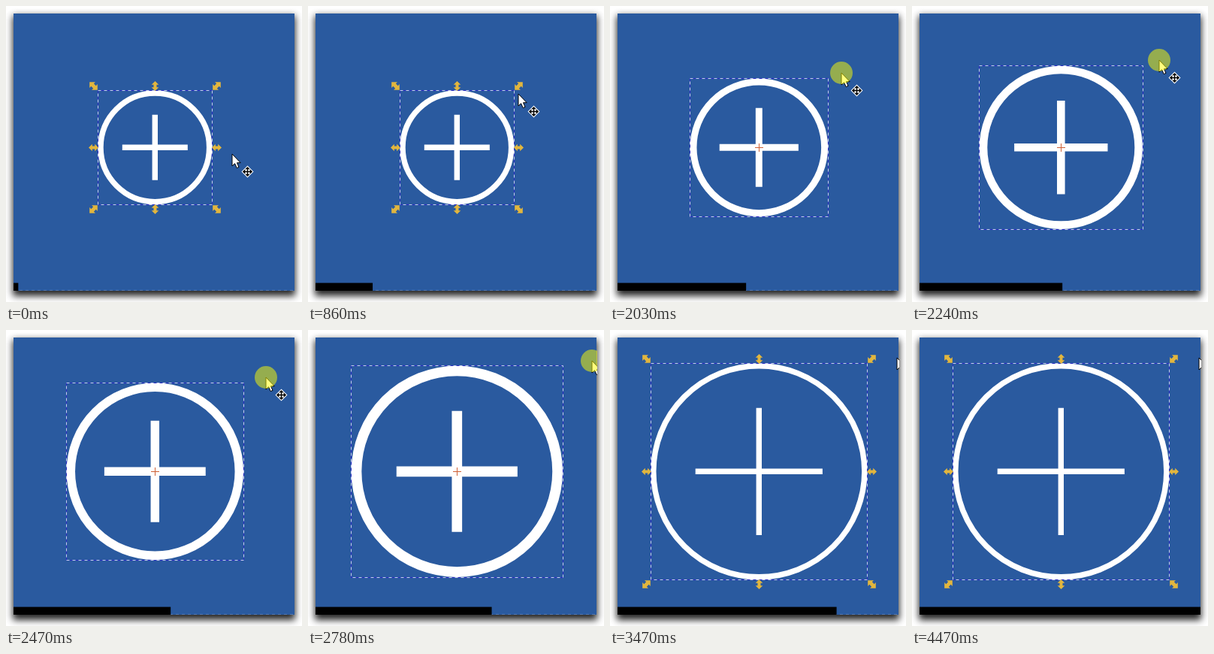
An HTML page that plays this animation: 394x394 px, repeating every 4550 ms.

```html
<!DOCTYPE html>
<html lang="en">
<head>
<meta charset="utf-8">
<title>Scaling an icon</title>
<style>
  html, body { margin: 0; width: 100%; height: 100%; overflow: hidden; background: #fff; }
  svg { display: block; width: 100vw; height: 100vh; }
</style>
</head>
<body>
<svg viewBox="0 0 394 394">
  <defs>
    <filter id="blur" x="-10%" y="-10%" width="120%" height="120%">
      <feGaussianBlur stdDeviation="5"/>
    </filter>
    <clipPath id="view"><rect x="10" y="10" width="375" height="370"/></clipPath>
    <path id="arrow" fill="#e2b63e"
      d="M-6.5 0L-1.7-4.8V-2H1.7V-4.8L6.5 0L1.7 4.8V2H-1.7V4.8Z"/>
    <path id="slant" fill="#e2b63e"
      d="M-7.5 0L-2-5.5V-2.5H2V-5.5L7.5 0L2 5.5V2.5H-2V5.5Z"/>
  </defs>

  <rect x="9" y="13" width="376" height="373" opacity=".85" filter="url(#blur)"/>
  <rect x="10" y="10" width="374" height="369" fill="#2a5a9f"/>
  <path d="M10 378.5H384" stroke="#8ea6cc" stroke-opacity=".4" stroke-dasharray="4 4"/>
  <rect id="bar" x="10" y="368.6" height="10.4"/>

  <g id="icon" fill="none" stroke="#fff" transform="translate(198.3 188.3)">
    <circle id="ring"/>
    <path id="plus"/>
  </g>
  <g fill="none">
    <rect class="box" stroke="#2a2cc4"/>
    <rect class="box" stroke="#c3cbee" stroke-dasharray="4 4"/>
  </g>
  <path id="pivot" d="M193 188.5H204M198.5 183V194" stroke="#cf6238"/>
  <g id="handles"></g>

  <g clip-path="url(#view)">
    <g id="cursor">
      <path d="M0 0V16L3.6 12.7L6.2 18.6L9 17.4L6.5 11.7H11.2Z" fill="#fff" stroke="#000"/>
      <g transform="translate(20.5 23.5)">
        <path d="M0-8L8 0L0 8L-8 0Z" fill="#fff"/>
        <path d="M-4 0H4M0-4V4" stroke="#000" stroke-width="1.4"/>
        <path d="M0-6.6L3.2-3.2H-3.2ZM0 6.6L3.2 3.2H-3.2ZM-6.6 0L-3.2-3.2V3.2ZM6.6 0L3.2-3.2V3.2Z"/>
      </g>
      <circle id="press" r="15" fill="#ff0" fill-opacity=".5"/>
    </g>
  </g>
</svg>
<script>
const $ = id => document.getElementById(id);
const LOOP = 4550, STEP = 77, STEPS = 59;
const CX = 198.5, CY = 188.5;
const BASE = 76, LINE = 7.4;
const PRESS = 22, RELEASE = 41;
const START_Y = 104;

// Drag path: step, x, y
const path = [
  [PRESS, 280, START_Y], [26, 308, 88.5], [29, 329, 72], [32, 346, 63],
  [36, 378, 40.5], [38, 382, 37]
];

function approach(step) {
  const left = Math.max(0, 1 - step / 14);
  return [280 + 21 * Math.max(0, 1 - step / 7), START_Y + 93 * left ** 1.3];
}

function dragged(step) {
  const i = path.findIndex(k => k[0] > step);
  if (i < 0) return path.at(-1).slice(1);
  const [s, x, y] = path[i - 1], [s2, x2, y2] = path[i];
  const p = (step - s) / (s2 - s);
  return [x + (x2 - x) * p, y + (y2 - y) * p];
}

function set(el, attrs) {
  for (const name in attrs) el.setAttribute(name, attrs[name]);
}

const show = (el, on) => set(el, { visibility: on ? "visible" : "hidden" });

const handles = [];
for (const dx of [-1, 0, 1]) for (const dy of [-1, 0, 1]) {
  if (!dx && !dy) continue;
  const el = document.createElementNS("http://www.w3.org/2000/svg", "use");
  set(el, { href: dx && dy ? "#slant" : "#arrow" });
  $("handles").append(el);
  handles.push({ el, dx, dy, turn: Math.atan2(dy, dx) * 180 / Math.PI });
}
const boxes = document.querySelectorAll(".box");

function draw(time) {
  const step = Math.min(STEPS - 1, Math.floor(time / STEP));
  const [x, y] = step < PRESS ? approach(step) : dragged(step);
  const drag = step >= PRESS && step < RELEASE;

  // The icon grows with the pointer's rise; its line only scales while dragging
  const half = BASE + (step < PRESS ? 0 : 1.018 * (START_Y - y));
  const edge = Math.round(half);
  const line = drag ? LINE * half / BASE : LINE;
  const r = half - line / 2, arm = r * 0.602;

  set($("bar"), { width: 374 * (step + 1) / STEPS });
  set($("icon"), { "stroke-width": line });
  set($("ring"), { r });
  set($("plus"), { d: `M${-arm} 0H${arm}M0 ${-arm}V${arm}` });
  for (const box of boxes)
    set(box, { x: CX - edge, y: CY - edge, width: 2 * edge, height: 2 * edge });
  for (const { el, dx, dy, turn } of handles)
    set(el, { transform: `translate(${CX + dx * (edge + 6)} ${CY + dy * (edge + 6)}) rotate(${turn})` });

  show($("handles"), !drag);
  show($("pivot"), drag);
  show($("press"), drag);
  set($("cursor"), { transform: `translate(${Math.round(x)} ${Math.round(y)})` });
}

const begin = performance.now();
function tick() {
  draw((performance.now() - begin) % LOOP);
  requestAnimationFrame(tick);
}
tick();
</script>
</body>
</html>
```
